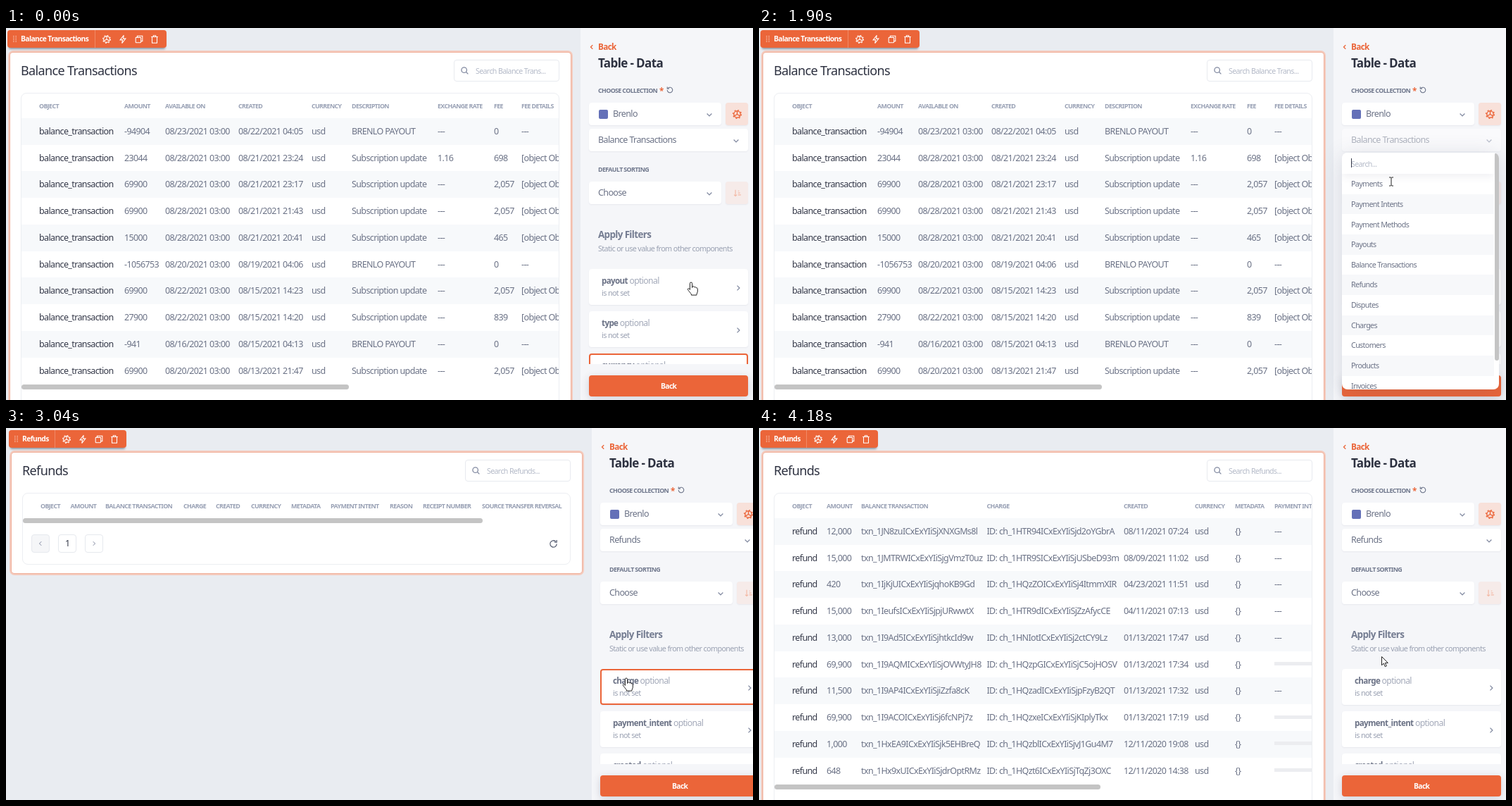
An HTML page that plays this animation: 1061 by 528 pixels, repeating every 4390 ms.

```html
<!DOCTYPE html>
<html lang="en">
<head>
<meta charset="utf-8">
<title>Table data source</title>
<style>
html, body { margin: 0; width: 100%; height: 100%; overflow: hidden; background: #e9ecf1; }
#stage { position: absolute; left: 0; top: 0; width: 1061px; height: 528px; overflow: hidden;
  font: 12.5px/20px "Noto Sans", "Open Sans", sans-serif; letter-spacing: -.05em; color: #6b7286; }
#stage div, #stage svg { position: absolute; box-sizing: border-box; }
.t { white-space: pre; height: 20px; }
.layer { left: 0; top: 0; width: 1061px; height: 528px; }
.bar { background: #eb6539; border-radius: 4px; box-shadow: 0 4px 3px -2px rgba(40,45,60,.45); }
.name { font-size: 10.3px; font-weight: 600; color: #fff; }
.card { background: #fff; border-radius: 4px; box-shadow: 0 0 0 1px #f0b09b, 0 0 0 3px #f4cbbe; }
.title { font-size: 18px; letter-spacing: -.035em; color: #2d3140; }
.field { border: 1px solid #e8eaef; border-radius: 4px; }
.hint { font-size: 10.6px; color: #b4bac8; }
.table { border: 1px solid #eceef2; border-radius: 8px; overflow: hidden; }
.head { font-size: 8.9px; font-weight: 600; color: #98a0b4; }
.row { left: 0; width: 1061px; height: 37.75px; background: #f7f9fb; }
.dark { color: #343848; }
.scroll { height: 7px; border-radius: 4px; background: #c4c4c4; }
.bone { background: #ecedf0; }
.pager { width: 26px; height: 26px; border: 1px solid #e6e9ee; border-radius: 4px; }
.panel { background: #f5f6f9; }
.back { font-size: 11.7px; font-weight: 600; color: #eb6539; }
.h1 { font-size: 17px; font-weight: 600; color: #2d3140; }
.label { font-size: 8.9px; font-weight: 600; color: #6f778c; }
.select, .filter { background: #fff; border-radius: 4px; box-shadow: 0 1px 2px rgba(50,60,90,.07); }
.h2 { font-size: 13.4px; font-weight: 600; color: #757d92; }
.note { font-size: 10.8px; color: #9aa1b2; }
.key { font-size: 11.6px; font-weight: 600; color: #6b7286; }
.key span { font-size: 12.2px; font-weight: 500; color: #a3a9b9; }
.hover { left: 1px; top: 0; width: 226px; height: 52px; border: 2px solid #eb6539; border-radius: 4px; }
.menu { left: 828px; top: 177px; width: 223px; height: 336px; border-radius: 8px; background: #fff;
  overflow: hidden; }
.shade { left: 828px; top: 177px; width: 223px; height: 336px; border-radius: 8px;
  box-shadow: 0 4px 30px rgba(60,70,100,.17); }
.item { left: 0; width: 216px; height: 28.65px; font-size: 10.7px; line-height: 28.65px; padding-left: 13px; }
.item:nth-child(even) { background: #f7f8fa; }
.find { left: 0; top: 0; width: 216px; height: 30px; background: #fff; box-shadow: 0 4px 12px rgba(60,70,100,.08); }
</style>
</head>
<body>
<div id="stage"></div>
<script>
const LOOP = 4390;
const stage = document.getElementById('stage');
const ORANGE = '#eb6539', GREY = '#8189a0';

const icons = {
  gear: '<circle cx="8" cy="8" r="5"/><circle cx="8" cy="8" r="6.3" stroke-dasharray="2 2.95"/><path d="M8 8V3M8 8l4.3 2.5M8 8l-4.3 2.5"/>',
  bolt: '<path d="M9.5 1.5 3.5 9h4l-1 5.5 6-7.5h-4z"/>',
  copy: '<rect x="2.5" y="5" width="8.5" height="8.5" rx="1"/><path d="M5 5V2.5h8.5V11H11"/>',
  bin: '<path d="M2.5 4h11M6 4V2h4v2M4 4v10h8V4"/>',
  dots: '<path d="M6 3.5v9.1M10 3.5v9.1" stroke-dasharray="0 3" stroke-linecap="round"/>',
  find: '<circle cx="7" cy="7" r="4.6"/><path d="M10.5 10.5 14 14"/>',
  down: '<path d="M3.5 6 8 10.5 12.5 6"/>',
  right: '<path d="M6 3.5 10.5 8 6 12.5"/>',
  left: '<path d="M10 3.5 5.5 8l4.5 4.5"/>',
  reload: '<path d="M13 8a5 5 0 1 1-1.6-3.7M13 2v3.5H9.5"/>',
  undo: '<path d="M3 8a5 5 0 1 0 1.6-3.7M3 2v3.5h3.5"/>',
  sort: '<path d="M5 2v11M2.5 10.5 5 13l2.5-2.5M9.5 4h2M9.5 7.5H13M9.5 11h5"/>'
};

function box(parent, cls, x, y, w, h, css = '') {
  const el = document.createElement('div');
  el.className = cls;
  el.style.cssText = `left:${x}px;top:${y}px;width:${w}px;height:${h}px;${css}`;
  return parent.appendChild(el);
}
// Text starts at x and is centred on y.
function text(parent, cls, x, y, html) {
  const el = document.createElement('div');
  el.className = 't ' + cls;
  el.style.cssText = `left:${x}px;top:${y - 10}px`;
  el.innerHTML = html;
  return parent.appendChild(el);
}
function icon(parent, name, x, y, size, color, width = 1.3) {
  parent.insertAdjacentHTML('beforeend',
    `<svg viewBox="0 0 16 16" width="${size}" height="${size}" style="left:${x - size / 2}px;top:${y - size / 2}px" fill="none" stroke="${color}" stroke-width="${width}">${icons[name]}</svg>`);
}
function layer(parent) {
  const el = document.createElement('div');
  el.className = 'layer';
  return parent.appendChild(el);
}

/* Main area */
const rowY = i => 147 + 37.73 * i;

function view(title, sep, { wide = false, bottom = 560, tableBottom = 560 } = {}) {
  const v = layer(stage), right = wide ? 800 : 786;
  if (wide) v.style.left = '2px';
  box(v, 'card', 6, 35, wide ? 810 : 796, bottom - 35);
  box(v, 'bar', 2, 3, sep + 100, 25);
  icon(v, 'dots', 12, 15, 13, '#f9cdbd', 1.8);
  text(v, 'name', 21, 15, title);
  box(v, '', sep, 3, 1, 25, 'background:#f08a67');
  ['gear', 'bolt', 'copy', 'bin'].forEach((n, i) => icon(v, n, sep + 17.3 + 22.7 * i, 15.5, 14, '#fff', 1.2));
  text(v, 'title', 21, 60, title);
  box(v, 'field', right - 150, 45, 150, 31);
  icon(v, 'find', right - 134.5, 60.5, 13, GREY, 1.6);
  text(v, 'hint', right - 119, 60.5, 'Search ' + (title.length > 8 ? 'Balance Trans' : title) + '...');
  const table = box(v, 'table', 21, 92, right - 21, tableBottom - 92);
  const body = layer(table);
  body.style.cssText = 'left:-22px;top:-93px;height:700px';
  return { v, body };
}
function heads(body, xs, names) {
  names.split('|').forEach((n, i) => text(body, 'head', xs[i], 110.5, n));
}
function stripes(body, n) {
  for (let i = 0; i < n; i += 2) box(body, 'row', 0, rowY(i) - 19, 1061, 37.75);
}
function cells(body, xs, y, values) {
  values.forEach((s, i) => s && text(body, i ? '' : 'dark', xs[i], y, s));
}

const balance = view('Balance Transactions', 126);
{
  const xs = [47, 168, 226, 330, 434, 491, 613, 693, 732];
  heads(balance.body, xs, 'OBJECT|AMOUNT|AVAILABLE ON|CREATED|CURRENCY|DESCRIPTION|EXCHANGE RATE|FEE|FEE DETAILS');
  stripes(balance.body, 10);
  `-94904 08/23 08/22 04:05 0
23044 08/28 08/21 23:24 698
69900 08/28 08/21 23:17 2,057
69900 08/28 08/21 21:43 2,057
15000 08/28 08/21 20:41 465
-1056753 08/20 08/19 04:06 0
69900 08/22 08/15 14:23 2,057
27900 08/22 08/15 14:20 839
-941 08/16 08/15 04:13 0
69900 08/20 08/13 21:47 2,057`.split('\n').forEach((line, i) => {
    const [amount, due, day, time, fee] = line.split(' '), payout = fee === '0';
    cells(balance.body, xs, rowY(i), ['balance_transaction', amount, due + '/2021 03:00', `${day}/2021 ${time}`, 'usd',
      payout ? 'BRENLO PAYOUT' : 'Subscription update', i === 1 ? '1.16' : '---', fee, payout ? '---' : '[object Object]']);
  });
  box(balance.body, 'scroll', 22, 505.5, 465, 7);
}

const empty = view('Refunds', 67, { wide: true, bottom: 206, tableBottom: 194 });
{
  heads(empty.body, [47, 89.5, 139, 250, 296, 346, 403, 459, 543, 590, 674],
    'OBJECT|AMOUNT|BALANCE TRANSACTION|CHARGE|CREATED|CURRENCY|METADATA|PAYMENT INTENT|REASON|RECEIPT NUMBER|SOURCE TRANSFER REVERSAL');
  box(empty.body, 'scroll', 22, 128, 653, 7);
  box(empty.body, 'pager', 34, 151, 26, 26, 'background:#f5f6f8');
  box(empty.body, 'pager', 72, 151, 26, 26);
  box(empty.body, 'pager', 110, 151, 26, 26);
  icon(empty.body, 'left', 47, 164, 10, GREY, 1.6);
  icon(empty.body, 'right', 123, 164, 10, GREY, 1.6);
  text(empty.body, 'dark', 82, 164, '1');
  icon(empty.body, 'reload', 775, 164, 15, '#5d6478', 1.4);
}

const loading = view('Refunds', 67, { wide: true, bottom: 291, tableBottom: 280 });
stripes(loading.body, 4);
for (let c = 0; c < 5; c++) {
  const x = 53 + 150.4 * c;
  box(loading.body, 'bone', x, 108, 46, 4);
  for (let r = 0; r < 4; r++)
    box(loading.body, 'bone', x, rowY(r) - 4, 57, 6, c ? '' : 'background:#e1e2e4');
}

const refunds = view('Refunds', 67);
const lateCells = [], lateBones = [];
{
  const xs = [47, 96, 145, 323.5, 518, 619, 676, 732];
  heads(refunds.body, xs, 'OBJECT|AMOUNT|BALANCE TRANSACTION|CHARGE|CREATED|CURRENCY|METADATA|PAYMENT INTENT');
  stripes(refunds.body, 10);
  `12,000 1JN8zuICxExYIiSjXNXGMs8l 1HTR94ICxExYIiSjd2oYGbrA 08/11/2021 07:24
15,000 1JMTRWICxExYIiSjgVmzT0uz 1HTR9SICxExYIiSjUSbeD93m 08/09/2021 11:02
420 1IjKjUICxExYIiSjqhoKB9Gd 1HQzZOICxExYIiSj4ItmmXIR 04/23/2021 11:51
15,000 1IeufsICxExYIiSjpjURwwtX 1HTR9dICxExYIiSjZzAfycCE 04/11/2021 07:13
13,000 1I9Ad5ICxExYIiSjhtkcId9w 1HNIotICxExYIiSj2ctCY9Lz 01/13/2021 17:47
69,900 1I9AQMICxExYIiSjOVWtyJH8 1HQzpGICxExYIiSjC5ojHOSV 01/13/2021 17:34
11,500 1I9AP4ICxExYIiSjiZzfa8cK 1HQzadICxExYIiSjpFzyB2QT 01/13/2021 17:32
69,900 1I9ACOICxExYIiSj6fcNPj7z 1HQzxeICxExYIiSjKIplyTkx 01/13/2021 17:19
1,000 1HxEA9ICxExYIiSjk5EHBreQ 1HQzblICxExYIiSjvJ1Gu4M7 12/11/2020 19:08
648 1Hx9xUICxExYIiSjdrOptRMz 1HQzt6ICxExYIiSjTqZj3OXC 12/11/2020 14:38`.split('\n').forEach((line, i) => {
    const [amount, txn, charge, day, time] = line.split(' '), y = rowY(i);
    cells(refunds.body, xs, y, ['refund', amount, 'txn_' + txn, 'ID: ch_' + charge, `${day} ${time}`, 'usd', '{}']);
    const late = i === 3 || i === 4, filled = i < 5 || i === 6;
    if (filled) {
      const dash = text(refunds.body, '', 732, y, '---');
      if (late) lateCells.push(dash);
    }
    if (!filled || late) {
      const bone = box(refunds.body, 'bone', 732, y - 3.5, 60, 5);
      if (late) lateBones.push(bone);
    }
  });
  box(refunds.body, 'scroll', 22, 505.5, 463, 7);
}

/* Settings panel */
const side = layer(stage);
box(side, 'panel', 816, 0, 245, 528);
icon(side, 'left', 832, 27, 10, ORANGE, 2);
text(side, 'back', 841, 26, 'Back');
text(side, 'h1', 841, 49.5, 'Table - Data');
text(side, 'label', 841, 89, 'CHOOSE COLLECTION');
text(side, 'back', 928, 88.5, '*');
icon(side, 'undo', 943, 88, 12, '#6f778c', 1.5);

function select(x, y, w, label, tx = 841) {
  const s = layer(side);
  box(s, 'select', x, y, w, 32);
  icon(s, 'down', x + w - 17, y + 16.5, 12, GREY, 1.7);
  return { s, label: text(s, '', tx, y + 16, label) };
}
select(828, 106, 188, 'Brenlo', 862);
box(side, '', 842, 116, 12.5, 12.5, 'background:#6470b8;border-radius:2px');
box(side, 'select', 1022, 106, 32, 32, 'background:#f8e1da');
icon(side, 'gear', 1038, 122, 15, ORANGE, 1.5);
const collection = select(828, 143, 226, 'Balance Transactions');
text(side, 'label', 841, 201, 'DEFAULT SORTING');
select(828, 218, 188, 'Choose');
box(side, 'select', 1022, 218, 32, 32, 'background:#f6ebe9');
icon(side, 'sort', 1038, 234, 13, '#f3b8a4', 1.4);
text(side, 'h2', 841, 293, 'Apply Filters');
text(side, 'note', 841, 313, 'Static or use value from other components');

const clip = box(side, '', 0, 0, 1061, 477, 'overflow:hidden');
const filters = [0, 1, 2].map(i => {
  const card = box(clip, 'filter', 828, 342 + 60 * i, 226, 51);
  const key = text(card, 'key', 18, 17, '');
  text(card, 'note', 18, 34, 'is not set');
  icon(card, 'right', 212, 26.5, 12, GREY, 1.7);
  return { key, hover: box(card, 'hover', 0, 0, 226, 51) };
});
box(side, '', 828, 493, 226, 29.5, 'background:#eb6539;border-radius:4px;box-shadow:0 3px 12px rgba(60,60,90,.2)');
text(side, 'name', 930, 507.5, 'Back');

/* Collection menu */
const drop = layer(stage);
const shade = document.createElement('div');
shade.className = 'shade';
const menu = document.createElement('div');
menu.className = 'menu';
drop.append(shade, menu);
const list = box(menu, '', 0, 30, 216, 320);
const items = ['Payments', 'Payment Intents', 'Payment Methods', 'Payouts', 'Balance Transactions', 'Refunds',
  'Disputes', 'Charges', 'Customers', 'Products', 'Invoices'].map((name, i) => {
  const el = box(list, 'item', 0, .2 + 28.65 * i, 216, 28.65);
  el.textContent = name;
  return el;
});
box(menu, 'find', 0, 0, 216, 30);
text(menu, 'hint', 13, 15.5, 'Search...');
const caret = box(menu, '', 12.5, 8, 1.5, 13, 'background:#343848');
box(menu, 'scroll', 216.5, 0, 6.5, 295).style.height = '295px';

/* Pointer; each shape has its hot spot at 0,0 */
stage.insertAdjacentHTML('beforeend', `<svg id="pointer" width="1" height="1" style="left:0;top:0;overflow:visible" fill="#fff" stroke="#222" stroke-linejoin="round">
<path data-kind="hand" transform="translate(-5.6 -.4)" d="M4 2a1.6 1.6 0 0 1 3.2 0v6l.2-1.2a1.4 1.4 0 0 1 2.6.2l.2.4a1.4 1.4 0 0 1 2.4.5l.3.5a1.3 1.3 0 0 1 2 1.1v4c0 1.5-1.2 2.4-1.4 4v1H6v-1.2C5 15.5 2 12.5 1 10.6.4 9.2 2 8.6 3 9.6l1 1.2z"/>
<path data-kind="arrow" d="M.5.5v12.2l2.8-2.6 2 4.6 2-.9-2-4.4h4z"/>
<path data-kind="beam" fill="none" d="M-3-6h2.3L0-5.3.7-6H3M0-5.3V5.3M-3 6h2.3L0 5.3.7 6H3"/></svg>`);
const pointer = document.getElementById('pointer');
const shapes = [...pointer.children];

/* Timing: the picture is held between these moments */
const ticks = [0, 70, 140, 210, 280, 350, 420, 490, 560, 630, 700, 770, 890, 960, 1370, 1900, 1970, 2040,
  2440, 2500, 2570, 2640, 2710, 2970, 3040, 3110, 3580, 3650, 3720, 3850, 3920, 4180];
const path = [[0, 973, 361], [140, 962, 340], [350, 918, 230], [490, 902, 172], [560, 900, 163], [1370, 900, 163],
  [1900, 898, 218], [1970, 889, 310], [2040, 881, 355], [3720, 881, 355], [3850, 883, 336], [3920, 884, 324]];
const kinds = [[0, 'hand'], [140, 'arrow'], [350, 'hand'], [420, 'arrow'], [490, 'hand'], [630, 'arrow'],
  [1900, 'beam'], [1970, 'hand'], [3850, 'arrow']];
const menuFade = [[560, 0], [770, .85], [890, 1], [2440, 1], [2500, .9], [2570, .77], [2640, .35], [2710, 0]];
const firstHover = [[0, 0], [140, 1], [210, 1], [350, 0], [2440, 0], [2570, .9], [2640, 1], [3720, 1], [3920, 0]];
const lastHover = [[0, 1], [140, 0]];

function at(keys, t, n = 1) {
  let i = keys.findIndex(k => k[0] > t);
  if (i === 0) return keys[0][n];
  if (i < 0) return keys[keys.length - 1][n];
  const a = keys[i - 1], b = keys[i];
  return a[n] + (b[n] - a[n]) * (t - a[0]) / (b[0] - a[0]);
}
const held = (keys, t) => keys.filter(k => k[0] <= t).pop()[1];
const within = (t, a, b) => t >= a && t < b;
const show = (el, on) => { el.style.display = on ? '' : 'none'; };

function draw(now) {
  const t = ticks.filter(k => k <= now).pop();
  show(balance.v, t < 2970);
  show(empty.v, within(t, 2970, 3580));
  show(loading.v, within(t, 3580, 3720));
  show(refunds.v, t >= 3720);
  lateCells.forEach(el => show(el, t >= 4180));
  lateBones.forEach(el => show(el, t < 4180));

  side.style.left = within(t, 2970, 3720) ? '16px' : '0';
  collection.label.textContent = t < 2440 ? 'Balance Transactions' : 'Refunds';
  const names = t < 2970 ? ['payout', 'type', 'currency'] : ['charge', 'payment_intent', 'created'];
  const glow = [at(firstHover, t), 0, at(lastHover, t)];
  filters.forEach((f, i) => {
    f.key.innerHTML = names[i] + ' <span>optional</span>';
    f.hover.style.opacity = glow[i];
  });

  const open = at(menuFade, t);
  drop.style.opacity = open;
  collection.s.style.opacity = 1 - .5 * Math.min(1, open * 1.3);
  show(caret, within(t, 700, 1370) || within(t, 1900, 2440));
  items[5].style.background = within(t, 2040, 2440) ? '#eff1f5' : '';

  const kind = held(kinds, t);
  shapes.forEach(s => show(s, s.dataset.kind === kind));
  pointer.style.transform = `translate(${at(path, t)}px, ${at(path, t, 2)}px)`;
}

const start = performance.now();
function frame() {
  draw((performance.now() - start) % LOOP);
  requestAnimationFrame(frame);
}
frame();
</script>
</body>
</html>
```
